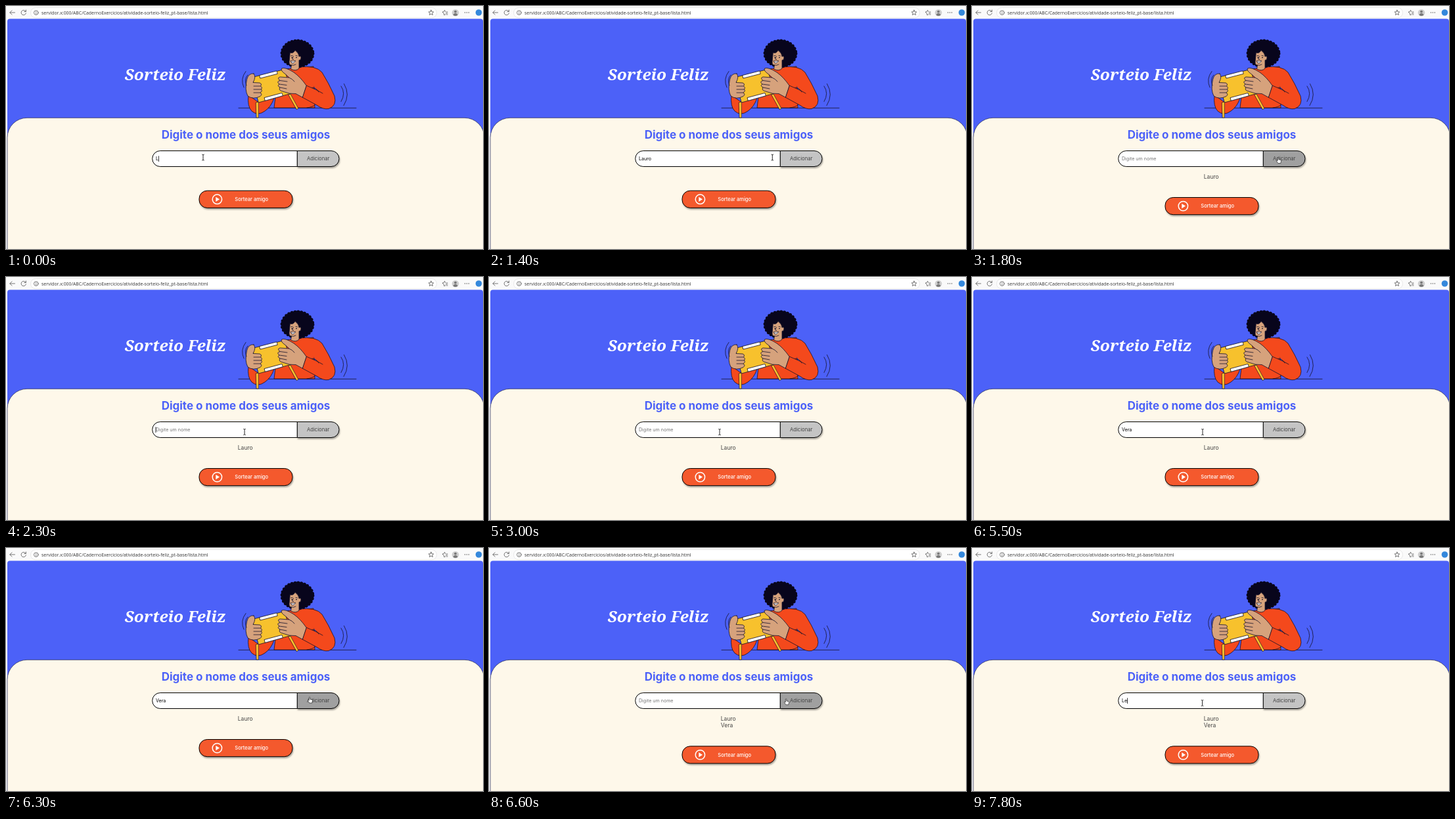
An HTML page that plays this animation: 726x370 px, repeating every 8 s.

```html
<!DOCTYPE html>
<html lang="pt">
<head>
<meta charset="utf-8">
<title>Sorteio Feliz</title>
<style>
  html, body { margin: 0; width: 100%; height: 100%; overflow: hidden; background: #fff; }
  svg { display: block; width: 726px; height: 370px; }
  text { font-family: Inter, "Liberation Sans", sans-serif; white-space: pre; }
  .ink { stroke: #17132b; stroke-width: .8; stroke-linejoin: round; stroke-linecap: round; }
  .line { fill: none; }
  .skin { fill: #d6a27c; }
  .shirt { fill: #f4491c; }
  .gold { fill: #f7c12d; }
  .icon { fill: none; stroke: #555; stroke-width: .8; stroke-linecap: round; stroke-linejoin: round; }
  .box { stroke: #000; stroke-width: 1; }
  .shade { filter: drop-shadow(1px 2px 1.3px rgba(0, 0, 0, .35)); }
</style>
</head>
<body>
<svg viewBox="0 0 726 370">
  <!-- browser bar -->
  <rect width="726" height="370" fill="#fafafa"/>
  <rect x="37.5" y="2.5" width="618" height="15.5" rx="7.7" fill="#fff" stroke="#e2e2e2" stroke-width=".8"/>
  <g class="icon">
    <path d="M13.5 10H6M9 6.8L5.8 10L9 13.2"/>
    <path d="M30 8.2A3.7 3.7 0 1 0 30.4 11M30.4 6V8.6H27.8"/>
    <circle cx="45.8" cy="10.2" r="3.3"/>
    <path d="M45.8 9.9V12M45.8 8.4V8.5"/>
    <path d="M647 6.2L648.1 8.8L650.9 9L648.8 10.8L649.5 13.6L647 12.1L644.5 13.6L645.2 10.8L643.1 9L645.9 8.8Z"/>
    <path d="M669 12.9L666.8 13.8L666.5 11.2L664 9.2L666.4 8.6L667.6 6.3L668.6 8.5M670 9H672M669.4 11H672M670.6 13H672"/>
    <path d="M698.5 10H698.6M701.4 10H701.5M704.3 10H704.4" stroke-width="1.3"/>
  </g>
  <circle cx="684" cy="10.2" r="5.3" fill="#cfcfcf"/>
  <circle cx="684" cy="8.6" r="1.9" fill="#777"/>
  <path d="M680.3 13.5Q684 8.6 687.7 13.5Q684 16.5 680.3 13.5Z" fill="#777"/>
  <circle cx="719.5" cy="10" r="4.8" fill="#3488dc"/>
  <text x="54" y="12.5" style="font: 6.9px 'Open Sans', 'Noto Sans', sans-serif" fill="#333">servidor.x:000/ABC/CadernoExercicios/atividade-sorteio-feliz_pt-base/lista.html</text>

  <!-- page -->
  <path d="M2 370V23.5Q2 19.6 6 19.6H722Q726 19.6 726 23.5V370Z" fill="#4c61f8"/>
  <path d="M2 371V200.3A30 30 0 0 1 32 170.3H698A30 30 0 0 1 728 200.3V371Z" fill="#fef8ea" stroke="#1c2050" stroke-width=".7"/>
  <text x="257.5" y="112.6" text-anchor="middle" fill="#fff" style="font: italic bold 24.4px 'Noto Serif', 'Liberation Serif', serif">Sorteio Feliz</text>

  <!-- person shaking a box -->
  <g class="ink">
    <path class="line" d="M354 155.3H533"/>
    <path class="shirt" d="M433 95Q420 96 414 105L408 155H470L468 92L446 94Z"/>
    <path class="shirt" d="M369 136Q367 153 374 160Q383 168 394 160Q404 153 408 140L384 146Z"/>
    <path class="shirt" d="M446 93Q472 90 481 101Q491 117 500 137Q504 152 491 156.5Q483 158 473 151L451 139L457 121L473 128"/>
    <path class="line" d="M473 128L482 133M466 124Q473 125 476 131M470 151Q466 154 458 155"/>
    <ellipse cx="443.5" cy="72.4" rx="23.2" ry="19.2" fill="#08051c" stroke="none"/>
    <ellipse cx="443.5" cy="72.4" rx="23.2" ry="19.2" fill="none" stroke="#08051c" stroke-width="5.4" stroke-dasharray="0 4.8"/>
    <path class="skin" d="M432.5 71Q437 73 440 67.5Q446 72 446 77Q449 75.5 449 79Q449 82.5 446 82.5V95Q441 100 433.5 96L434.5 90Q431 90 431 86Z"/>
    <path class="line" d="M433.5 76L436 75.5M441 75.5L443.5 76M437.3 76.5L435.6 81L437.8 81.5M434.5 90Q438 91 441 89"/>
    <path d="M433.6 83.6Q437.5 85 440.5 83.2Q439 87.6 435.2 86.8Z" fill="#fff"/>
    <circle cx="435.2" cy="78.5" r=".5"/><circle cx="442" cy="78.5" r=".5"/>
    <path class="gold" d="M375 108.5L424 96.5L434.5 133L384.5 147Z"/>
    <path d="M386 105.5L412 98.8L413.2 103.3L387.3 110Z" fill="#fff"/>
    <path d="M393.4 139.5L420 132.4L421.3 136.7L394.7 144.2Z" fill="#fff"/>
    <path class="gold" d="M380.5 147L384.3 146V170H381.3Z" stroke-width=".6"/>
    <path class="gold" d="M430 135L433 134L445 156L442.5 157.5Z" stroke-width=".6"/>
    <path class="skin" d="M377 103Q369 102 366.5 112Q363 128 368 137Q376 143 387 137.5Q391 134 386.5 132Q391 130 388.5 127Q391 124 387.5 122Q390 118.5 386 117L376 116.5Q381 108 377 103Z"/>
    <path class="line" d="M377 122L387 122M377 127L388 127M377 132L386 132"/>
    <path class="skin" d="M457 121Q448 108 438 101Q425 92.5 419.5 95Q417.5 98.5 425 103.5L431 109L417 108Q412 109.5 417 113.5Q411 115 416 119Q412 121.5 417 124Q414 128.5 421 130Q432 134.5 441 133.5L451 139Z"/>
    <path class="line" d="M417 113.5L428 115M416 119L427 120.5M417 124L427 126M431 109Q436 111 439 115"/>
    <path class="line" d="M510 122Q517.5 133 510 145.5M514.5 118.5Q524.5 135 514 151.5M362 124Q356 111 365 99.5M366 121Q362 111 368 105"/>
  </g>

  <!-- form -->
  <text x="365" y="201.8" text-anchor="middle" font-size="17" font-weight="700" fill="#4c61f8">Digite o nome dos seus amigos</text>
  <path class="box shade" id="add" d="M443.2 220.5H495A12 12 0 0 1 495 244.5H443.2Z"/>
  <path class="box" d="M443.2 220.5H234.7A12 12 0 0 0 234.7 244.5H443.2Z" fill="#fff"/>
  <text x="475.2" y="235.2" text-anchor="middle" font-size="7.65" fill="#444">Adicionar</text>
  <text id="field" x="228" y="235.1" font-size="7.1"></text>
  <path id="caret" d="M0 228.3V237" stroke="#000" stroke-width=".8"/>
  <g font-size="8.5" fill="#444">
    <text id="first" x="352.8" y="263">Lauro</text>
    <text id="second" x="352.8" y="273.3">Vera</text>
  </g>
  <g id="draw">
    <rect class="box shade" x="294" y="281.2" width="142" height="26.2" rx="12.2" fill="#f4592d"/>
    <circle cx="321.4" cy="294.3" r="7.2" fill="none" stroke="#fff" stroke-width="1.5"/>
    <path d="M319.3 290.7V297.9L325 294.3Z" fill="#fff"/>
    <text x="373.7" y="297" text-anchor="middle" font-size="7.55" font-weight="500" fill="#fff">Sortear amigo</text>
  </g>

  <!-- pointers, both centred on 0,0 -->
  <path id="beam" class="line" d="M-1.7 -4.5Q0 -4.5 0 -3.5Q0 -4.5 1.7 -4.5M0 -3.5V3.5M-1.7 4.5Q0 4.5 0 3.5Q0 4.5 1.7 4.5" stroke="#111" stroke-width=".9"/>
  <path id="hand" d="M-1.8 -4.2Q-.9 -5.2 -.2 -4.2V-1.3L2.8 -.6Q3.7 -.2 3.5 1L2.8 4.5H-1.2L-3.6 1Q-3.7 -.2 -2.7 0L-1.8 .8Z" fill="#fff" stroke="#222" stroke-width=".7"/>
</svg>
<script>
const LOOP = 8000, STEP = 100;
const $ = id => document.getElementById(id);
const show = (id, on) => $(id).setAttribute("visibility", on ? "visible" : "hidden");

// [start, typed text, caret visible]
const typing = [
  [0, "L", 1], [300, "La", 1], [500, "Laur", 1], [600, "Lauro", 1], [1100, "Lauro", 0],
  [1700, "", 0], [2300, "", 1], [2800, "", 0],
  [3300, "V", 1], [3800, "V", 0], [3900, "Ve", 1], [4500, "Ve", 0],
  [4700, "Ver", 1], [5000, "Vera", 1], [5500, "Vera", 0],
  [6500, "", 0], [6800, "", 1], [7300, "", 0], [7500, "L", 1], [7800, "Le", 1]
];

// [time, x, y] of the pointer
const route = [
  [0, 300, 230.5], [1000, 300, 230.5], [1570, 467, 230.5], [1750, 467, 235], [1900, 467, 235],
  [2400, 351, 236], [5600, 351, 236], [6300, 463, 231.5], [6500, 465, 234],
  [7000, 350.5, 236], [LOOP, 350.5, 236]
];

function pointer(t) {
  const i = route.findIndex(k => k[0] > t);
  const [t0, x0, y0] = route[i - 1], [t1, x1, y1] = route[i];
  const p = (t - t0) / (t1 - t0), e = p * p * (3 - 2 * p);
  return [x0 + (x1 - x0) * e, y0 + (y1 - y0) * e];
}

function render(t) {
  const [, typed, blink] = typing.filter(k => k[0] <= t).pop();
  const field = $("field");
  field.textContent = typed || "Digite um nome";
  field.setAttribute("fill", typed ? "#000" : "#757575");
  const end = typed ? field.getComputedTextLength() + .4 : 0;
  $("caret").setAttribute("transform", `translate(${228 + end} 0)`);
  show("caret", blink);

  const count = (t >= 1700) + (t >= 6500);
  show("first", count > 0);
  show("second", count > 1);
  $("draw").setAttribute("transform", `translate(0 ${count * 10.3})`);

  const [x, y] = pointer(t), over = x > 443;
  $("add").setAttribute("fill", over ? "#a0a0a0" : "#c4c4c4");
  show("beam", !over);
  show("hand", over);
  for (const id of ["beam", "hand"]) $(id).setAttribute("transform", `translate(${x} ${y})`);
}

function tick() {
  render(Math.floor(performance.now() % LOOP / STEP) * STEP);
  requestAnimationFrame(tick);
}
tick();
</script>
</body>
</html>
```
